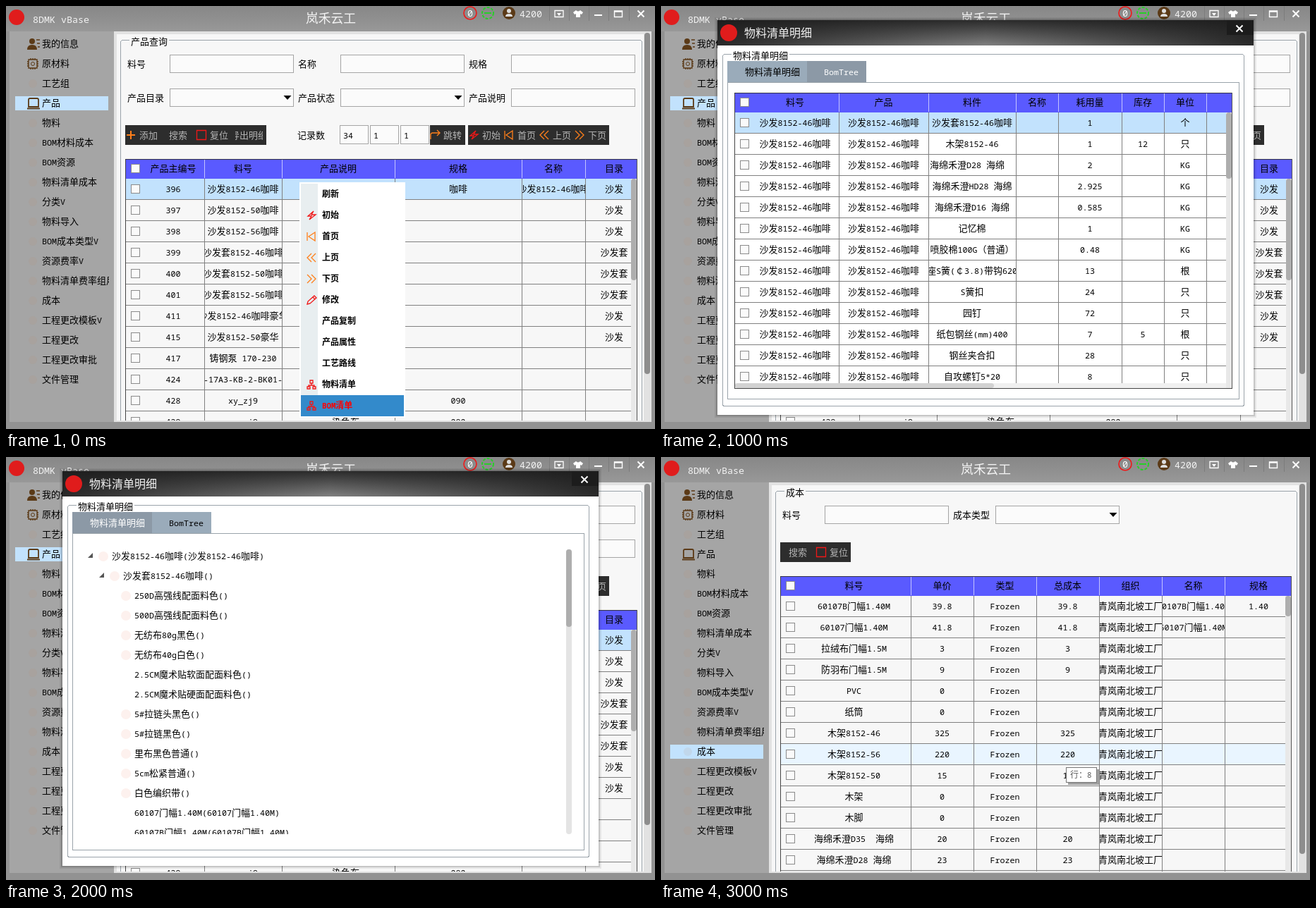
An HTML page that plays this animation: 920x600 px, repeating every 4000 ms.

```html
<!DOCTYPE html>
<html lang="zh">
<head>
<meta charset="utf-8">
<title>产品查询</title>
<style>
html, body { margin: 0; width: 100%; height: 100%; overflow: hidden; background: #929292 }
svg { display: block }
text { white-space: pre; font-family: "Noto Sans Mono CJK SC", "Noto Sans CJK SC", "Noto Sans CJK", sans-serif }
.latin { font-family: "Noto Sans Mono", "DejaVu Sans Mono", monospace; font-size: .8974em }
rect { shape-rendering: crispEdges }
</style>
</head>
<body>
<svg id="stage" width="920" height="600">
  <defs>
    <linearGradient id="bar" x2="0" y2="1"><stop stop-color="#878787"/><stop offset="1" stop-color="#989898"/></linearGradient>
    <linearGradient id="glow"><stop stop-color="#2a2a2a"/><stop offset=".5" stop-color="#808080"/><stop offset="1" stop-color="#2a2a2a"/></linearGradient>
    <linearGradient id="shade" x2="0" y2="1"><stop stop-color="#1c1c1c" stop-opacity=".85"/><stop offset="1" stop-color="#1c1c1c" stop-opacity="0"/></linearGradient>
  </defs>
</svg>
<script>
const stage = document.getElementById('stage');
const BLUE = '#5a5aff', PICK = '#c2e2fd', ORANGE = '#ff7f1a', RED = '#f01818', PAPER = '#f7f7f7', BROWN = '#5b3a17';

// Drawing helpers; each returns SVG markup.
const box = (x, y, w, h, fill, more = '') => `<rect x="${x}" y="${y}" width="${w}" height="${h}" fill="${fill}" ${more}/>`;
const frame = (x, y, w, h, line, fill = 'none', r = 0) =>
  box(x + .5, y + .5, w - 1, h - 1, fill, `stroke="${line}" rx="${r}"`);
const pill = (x, y, w, h, fill) => box(x, y, w, h, fill, 'rx="4" style="shape-rendering:auto"');
const disc = (x, y, r, fill, more = '') => `<circle cx="${x}" cy="${y}" r="${r}" fill="${fill}" ${more}/>`;
const path = (x, y, d, line, w = 1.3, fill = 'none') =>
  `<path transform="translate(${x} ${y})" d="${d}" stroke="${line}" stroke-width="${w}" fill="${fill}"/>`;
const clip = (x, y, w, h, inner) =>
  `<svg x="${x}" y="${y}" width="${w}" height="${h}" viewBox="${x} ${y} ${w} ${h}">${inner}</svg>`;
// y is the middle of the line
const label = (x, y, s, fill = '#000', size = 13, more = '') =>
  `<text x="${x}" y="${y + size * .36}" fill="${fill}" font-size="${size}" ${more}>` +
  s.replace(/[ -~]+/g, m => `<tspan class="latin">${m}</tspan>`) + '</text>';
const middle = (x, y, s, fill) => label(x, y, s, fill, 13, 'text-anchor="middle"');

const icons = {
  plus: ['M-6 0H6M0-6V6', ORANGE, 2],
  bolt: ['M3-6L-5 1H0L-3 6L6-1H0Z', RED],
  first: ['M-6-6V6M5-6L-4 0L5 6Z', ORANGE],
  prev: ['M0-6L-6 0L0 6M6-6L0 0L6 6', ORANGE],
  next: ['M-6-6L0 0L-6 6M0-6L6 0L0 6', ORANGE],
  jump: ['M-7 6V0Q-7-3-4-3H6M2-7L6-3L2 1', ORANGE],
  square: ['M-6.5-6.5h13v13h-13z', RED],
  pencil: ['M-6 6L-5 2L4-6L7-3L-2 5ZM2-4L5-1', RED],
  nodes: ['M0-2V1M-4 3V1H4V3M-2-6h4v4h-4zM-6 3h4v3h-4zM2 3h4v3h-4z', RED]
};
const icon = (name, x, y) => path(x, y, ...icons[name]);

const check = (x, y) => frame(x - 6, y - 6, 13, 13, '#8b8b8b', '#fafafa');
const field = (x, y, w = 176, h = 26) => frame(x, y, w, h, '#a5a5a5', '#fbfbfb');
const combo = (x, y) => field(x, y) + path(x + 167, y + 13, 'M-5.5-3H5.5L0 3Z', 'none', 0, '#000');
const strip = (x, y, w) => box(x, y, w, 28, '#2d2d2d');
const tool = (x, y, s) => label(x, y, s, '#b4b4b4');
const group = (x, y, w, h, s, bg) => frame(x, y, w, h, '#9aa3aa', 'none', 3) +
  box(x + 13, y - 2, s.length * 13 + 4, 8, bg) + label(x + 15, y + 2, s);

function table(x, y, w, bottom, edges, heads, rows, opt) {
  const right = x + w, body = right - 9, xs = [x, ...edges], top = y + 28;
  let out = box(x, top, body - x, bottom - top, opt.bg) + box(body, top, 9, bottom - top, '#e8e8e8');
  const cell = (i, cy, h, s) => {
    if (!s) return '';
    const a = xs[i] + (i ? 0 : 24), b = xs[i + 1];
    return clip(a, cy, b - a, h, middle((a + b) / 2, cy + h / 2, s));
  };
  rows.forEach((row, r) => {
    const ry = top + r * 30;
    if (r == opt.pick) out += box(x, ry, body - x, 29, opt.tint);
    out += box(x, ry + 29, body - x, 1, '#808080') + check(x + 14, ry + 14);
    row.forEach((s, i) => out += cell(i, ry, 29, s));
  });
  edges.slice(0, -1).forEach(e => out += box(e, top, 1, bottom - top, '#808080'));
  out += box(x, y, w, 28, BLUE) + check(x + 14, y + 13);
  edges.slice(0, -1).forEach(e => out += box(e, y, 1, 27, '#c4c4ff'));
  heads.forEach((s, i) => out += cell(i, y, 27, s));
  out += pill(body, top, 8, opt.thumb, '#aeaeae');
  out += box(x, y, 1, bottom - y, '#444') + box(x, y, w, 1, '#334') + box(right - 1, y, 1, bottom - y, '#555');
  return clip(x, y, w, bottom - y, out);
}

const menuItems = ['我的信息', '原材料', '工艺组', '产品', '物料', 'BOM材料成本', 'BOM资源', '物料清单成本', '分类V',
  '物料导入', 'BOM成本类型V', '资源费率V', '物料清单费率组用', '成本', '工程更改模板V', '工程更改', '工程更改审批', '文件管理'];

function sidebar(pick) {
  let out = box(5, 36, 149, 554, '#a5a5a5') + box(13, 128 + (pick - 3) * 28, 132, 20, PICK);
  menuItems.forEach((s, i) => {
    const y = 53 + 28 * i;
    if (i == 0) out += disc(37, 50, 4, BROWN) + path(37, 61, 'M-7 1Q-7-6 0-6Q7-6 7 1Z', 'none', 0, BROWN) +
      path(45, 53, 'M-2-5H3M-1 0H3M0 5H3', BROWN, 1.6);
    else if (i == 1) out += path(38, 82, 'M-6-6h12v12h-12zM-3-8v2M0-8v2M3-8v2M-3 6v2M0 6v2M3 6v2M-8-3h2M-8 0h2M-8 3h2M6-3h2M6 0h2M6 3h2', BROWN, 1.4) +
      disc(38, 82, 2.5, 'none', `stroke="${BROWN}"`);
    else if (i == 3) out += path(39, 138, 'M-7 5V-5Q-7-7-5-7H5Q7-7 7-5V5ZM-9 7.5H9', BROWN, 1.8);
    else out += disc(38, y + 1, 6, '#c08a6a', 'opacity=".12"');
    out += clip(0, y - 10, 146, 20, label(51, y, s));
  });
  return out;
}

function titleBar() {
  let out = box(0, 0, 920, 36, 'url(#bar)') + disc(15, 16, 11, '#e01c1c') +
    label(38, 19, '8DMK vBase', '#f2f2f2', 14.86) + label(425, 18, '岚禾云工', '#f2f2f2', 17.8) +
    disc(658, 10, 9, 'none', `stroke="${RED}" stroke-width="1.6"`) + label(654, 10, '0', '#fff', 14.86) +
    disc(683, 10, 8, 'none', 'stroke="#28d028" stroke-width="2" stroke-dasharray="4 2"') +
    path(683, 10, 'M-5 0H5', '#28d028', 2) +
    disc(713, 10, 9, BROWN) + disc(713, 7, 3, '#ddd') + path(713, 15, 'M-5 0Q-5-4 0-4Q5-4 5 0Z', 'none', 0, '#ddd') +
    label(728, 11, '4200', '#f2f2f2', 14.86);
  for (const x of [770, 798, 826, 854, 883]) out += box(x, 0, 1, 21, '#7c7c7c');
  return out + path(784, 11, 'M-6-4.5H6V4.5H-6Z', '#fff') + path(784, 11, 'M-3-1H3L0 3Z', 'none', 0, '#fff') +
    path(811, 11, 'M-3-5Q0-2 3-5L7-2L5 1L3 0V5H-3V0L-5 1L-7-2Z', 'none', 0, '#fff') +
    box(834, 12, 11, 2, '#fff') + path(868, 11, 'M-5.5-4H5.5V4.5H-5.5ZM-5.5-3H5.5', '#fff', 1.4) +
    path(900, 11, 'M-4.5-4.5L4.5 4.5M4.5-4.5L-4.5 4.5', '#fff', 2);
}

const page = (pick, thumb, title, inner) => box(0, 0, 920, 600, '#929292') + titleBar() + sidebar(pick) +
  box(153, 36, 762, 554, '#e2e2e2') + box(157, 40, 747, 548, PAPER) + pill(905, 38, 8, thumb, '#8d8d8d') +
  clip(157, 40, 747, 548, group(162, 48, 740, 560, title, PAPER) + inner);

function products() {
  const sofa = (id, s, dir) => [id, s, '', '', '', dir];
  const rows = [
    ['396', '沙发8152-46咖啡', '', '咖啡', '沙发8152-46咖啡', '沙发'],
    sofa('397', '沙发8152-50咖啡', '沙发'), sofa('398', '沙发8152-56咖啡', '沙发'),
    sofa('399', '沙发套8152-46咖啡', '沙发套'), sofa('400', '沙发套8152-50咖啡', '沙发套'),
    sofa('401', '沙发套8152-56咖啡', '沙发套'), sofa('411', '沙发8152-46咖啡豪华', '沙发'),
    sofa('415', '沙发8152-50豪华', '沙发'), sofa('417', '铸钢泵 170-230'), sofa('424', 'H-17A3-KB-2-BK01-H'),
    ['428', 'xy_zj9', '', '090'], ['429', 'xy_zj9', '   染色布', '080']
  ];
  let out = '';
  [['料号', '产品目录'], ['名称', '产品状态'], ['规格', '产品说明']].forEach(([a, b], i) => {
    const x = 172 + 242 * i;
    out += label(x, 82, a) + label(x, 130, b) + field(x + 60, 69) + (i < 2 ? combo : field)(x + 60, 117);
  });
  out += strip(169, 169, 200) + icon('plus', 177, 183) + tool(189, 183, '添加') + tool(231, 183, '搜索') +
    icon('square', 277, 183) + tool(289, 183, '复位') + clip(325, 170, 39, 26, tool(318, 183, '导出明细')) +
    label(413, 183, '记录数');
  ['34', '1', '1'].forEach((s, i) => out += field(473 + 43 * i, 169, 41, 27) + label(478 + 43 * i, 183, s));
  out += strip(601, 169, 50) + icon('jump', 609, 183) + tool(620, 183, '跳转') + strip(655, 169, 200);
  [['bolt', '初始'], ['first', '首页'], ['prev', '上页'], ['next', '下页']].forEach(([n, s], i) =>
    out += icon(n, 663 + 50 * i, 183) + tool(675 + 50 * i, 183, s));
  return page(3, 484, '产品查询', out + table(169, 217, 726, 588, [281, 391, 551, 731, 821, 903],
    ['产品主编号', '料号', '产品说明', '规格', '名称', '目录'], rows, { bg: PAPER, pick: 0, tint: PICK, thumb: 144 }));
}

function costs() {
  const rows = [
    ['60107B门幅1.40M', '39.8', '60107B门幅1.40M', '1.40'], ['60107门幅1.40M', '41.8', '60107门幅1.40M'],
    ['拉绒布门幅1.5M', '3'], ['防羽布门幅1.5M', '9'], ['PVC', '0'], ['纸筒', '0'], ['木架8152-46', '325'],
    ['木架8152-56', '220'], ['木架8152-50', '15'], ['木架', '0'], ['木脚', '0'],
    ['海绵禾澄D35  海绵', '20'], ['海绵禾澄D28 海绵', '23']
  ].map(([s, n, name, size]) => [s, n, 'Frozen', n == '0' ? '' : n, '青岚南北坡工厂', name, size]);
  return page(13, 525, '成本', label(172, 82, '料号') + field(232, 69) + label(414, 82, '成本类型') + combo(474, 69) +
    strip(169, 121, 100) + tool(181, 135, '搜索') + icon('square', 227, 135) + tool(239, 135, '复位') +
    table(169, 169, 725, 588, [354, 443, 532, 621, 710, 799, 895],
      ['料号', '单价', '类型', '总成本', '组织', '名称', '规格'], rows, { bg: PAPER, pick: 7, tint: '#e9f5ff', thumb: 29 }) +
    box(577, 443, 44, 22, '#000', 'opacity=".35"') + frame(574, 440, 44, 22, '#777', '#fff') +
    label(580, 451, '行：8', '#575757', 12));
}

function popup() {
  const items = [['刷新'], ['初始', 'bolt'], ['首页', 'first'], ['上页', 'prev'], ['下页', 'next'], ['修改', 'pencil'],
    ['产品复制'], ['产品属性'], ['工艺路线'], ['物料清单', 'nodes'], ['BOM清单', 'nodes']];
  let out = box(416, 250, 150, 334, '#fff') + box(418, 252, 24, 330, '#e8eef0') + box(418, 552, 146, 30, '#338acb');
  items.forEach(([s, n], i) => {
    const y = 267 + 30 * i;
    out += (n ? icon(n, 433, y) : '') + label(448, y, s, i == 10 ? '#ff0000' : '#000', 12, 'font-weight="700"');
  });
  return out;
}

function partList() {
  const rows = [
    ['沙发套8152-46咖啡', '1', '', '个'], ['木架8152-46', '1', '12', '只'], ['海绵禾澄D28 海绵  ', '2', '', 'KG'],
    ['海绵禾澄HD28 海绵', '2.925', '', 'KG'], ['海绵禾澄D16 海绵', '0.585', '', 'KG'], ['记忆棉', '1', '', 'KG'],
    ['喷胶棉100G（普通）', '0.48', '', 'KG'], ['座S簧(￠3.8)带钩620', '13', '', '根'], ['S簧扣', '24', '', '只'],
    ['园钉', '72', '', '只'], ['纸包钢丝(mm)400', '7', '5', '根'], ['钢丝夹合扣', '28', '', '只'], ['自攻螺钉5*20', '8', '', '只']
  ].map(([s, n, stock, unit]) => ['沙发8152-46咖啡', '沙发8152-46咖啡', s, '', n, stock, unit]);
  return table(104, 123, 706, 543, [252, 379, 503, 563, 653, 713, 773, 810],
    ['料号', '产品', '料件', '名称', '耗用量', '库存', '单位'], rows, { bg: '#fff', pick: 0, tint: PICK, thumb: 94 }) +
    box(105, 535, 696, 7, '#f0f0f0') + pill(105, 535, 367, 7, '#d2d2d2') + box(104, 542, 706, 1, '#444');
}

function partTree() {
  const names = ['沙发8152-46咖啡(沙发8152-46咖啡)', '沙发套8152-46咖啡()', '250D高强线配面料色()', '500D高强线配面料色()',
    '无纺布80g黑色()', '无纺布40g白色()', '2.5CM魔术贴软面配面料色()', '2.5CM魔术贴硬面配面料色()', '5#拉链头黑色()',
    '5#拉链黑色()', '里布黑色普通()', '5cm松紧普通()', '白色编织带()', '60107门幅1.40M(60107门幅1.40M)',
    '60107B门幅1.40M(60107B门幅1.40M)'];
  let out = '';
  names.forEach((s, i) => {
    const x = 150 + 16 * Math.min(i, 2), y = 140 + 28 * i;
    if (i < 2) out += path(x - 30, y, 'M3-4V3H-4Z', 'none', 0, '#555');
    if (!/^(2\.5|60107)/.test(s)) out += disc(x - 12, y + 1, 7, '#fdf1ee');
    out += label(x, y, s);
  });
  return clip(95, 109, 690, 426, out) + pill(794, 131, 8, 404, '#e4e4e4') + pill(794, 131, 8, 110, '#aeaeae');
}

function dialog(tab) {
  const tone = i => i == tab ? '#9aabba' : '#8c99a6', ink = i => i == tab ? '#000' : '#fff';
  return box(76, 16, 768, 568, '#000', 'opacity=".07"') + box(78, 18, 764, 564, '#000', 'opacity=".14"') +
    box(80, 20, 760, 560, '#fff') + box(80, 20, 760, 36, 'url(#glow)') + box(80, 20, 760, 36, 'url(#shade)') +
    disc(96, 38, 12, '#e01c1c') + label(118, 38, '物料清单明细', '#f2f2f2', 16) +
    box(802, 20, 38, 21, '#1c1c1c') + path(820, 32, 'M-4.5-4.5L4.5 4.5M4.5-4.5L-4.5 4.5', '#fff', 2) +
    group(87, 68, 740, 500, '物料清单明细', '#fff') + frame(94, 108, 726, 450, '#9aa3aa') +
    box(94, 78, 113, 30, tone(0)) + label(119, 93, '物料清单明细', ink(0)) +
    box(207, 78, 84, 30, tone(1)) + label(231, 93, 'BomTree', ink(1)) + (tab ? partTree() : partList());
}

const layers = [products(), popup(), dialog(0), dialog(1), costs()];
stage.insertAdjacentHTML('beforeend', layers.map(s => `<g class="layer">${s}</g>`).join(''));
const nodes = [...stage.querySelectorAll('.layer')];
const scenes = [[0, 1], [0, 2], [0, 3], [4]];   // layers shown in each second

function draw() {
  const shown = scenes[Math.floor(performance.now() % 4000 / 1000)];
  nodes.forEach((g, i) => g.style.display = shown.includes(i) ? '' : 'none');
  requestAnimationFrame(draw);
}
draw();
</script>
</body>
</html>
```
